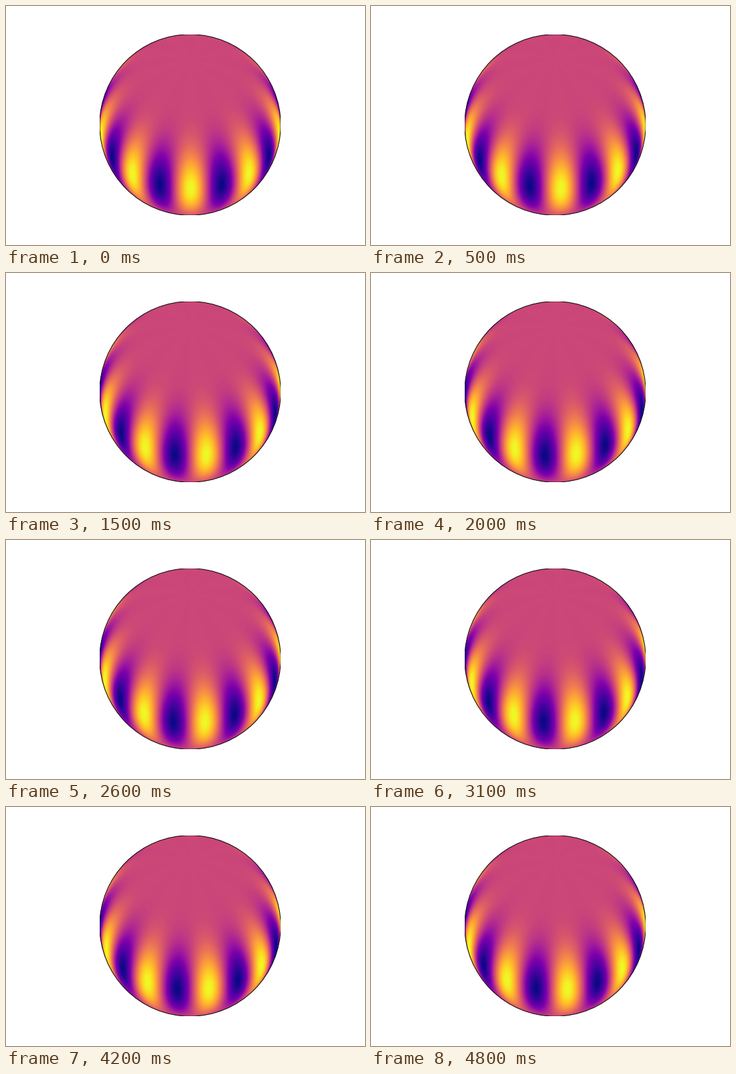
A matplotlib script that plays this animation: 540 px wide and 360 px high, repeating every 4.9 s.

```python
import numpy as np
import matplotlib.pyplot as plt
from matplotlib.animation import FuncAnimation
from matplotlib.patches import Circle

W, H, DPI = 540, 360, 100
FRAMES, INTERVAL = 49, 100
CX, CY, R = 277, 179, 136
ORDER = 9                    # sectoral harmonic, degree = order
TILT = np.radians(45)        # latitude at the centre of the view
OFFSET = np.radians(0.45)

fig = plt.figure(figsize=(W / DPI, H / DPI), dpi=DPI, facecolor="white")
ax = fig.add_axes([0, 0, 1, 1])
ax.set_xlim(0, W)
ax.set_ylim(H, 0)
ax.axis("off")

# Inverse orthographic projection at pixel centres
step = (np.arange(2 * R) + 0.5 - R) / R
x, y = np.meshgrid(step, -step)
z = np.sqrt(np.clip(1 - x**2 - y**2, 0, 1))
sin_lat = z * np.sin(TILT) + y * np.cos(TILT)
lon = np.arctan2(x, z * np.cos(TILT) - y * np.sin(TILT))
envelope = np.clip(1 - sin_lat**2, 0, 1) ** (ORDER / 2)


def harmonic(i):
    turn = OFFSET - 2 * np.pi * i / FRAMES
    return envelope * np.cos(ORDER * (lon - turn))


box = (CX - R, CX + R, CY + R, CY - R)
globe = ax.imshow(harmonic(0), cmap="plasma", vmin=-1, vmax=1, extent=box,
                  interpolation="nearest", aspect="auto")
ax.set_xlim(0, W)
ax.set_ylim(H, 0)
globe.set_clip_path(Circle((CX, CY), R + 0.2, transform=ax.transData))

# The outline is cut off where it leaves the square around the globe
limb = ax.add_patch(Circle((CX, CY), R + 0.2, fill=False, ec="black",
                           lw=72 / DPI))
frame = plt.Rectangle((CX - R, CY - R), 2 * R, 2 * R, transform=ax.transData)
limb.set_clip_path(frame)


def update(i):
    globe.set_data(harmonic(i))
    return (globe,)


anim = FuncAnimation(fig, update, frames=FRAMES, interval=INTERVAL,
                     repeat=True, repeat_delay=0)
plt.show()
```
